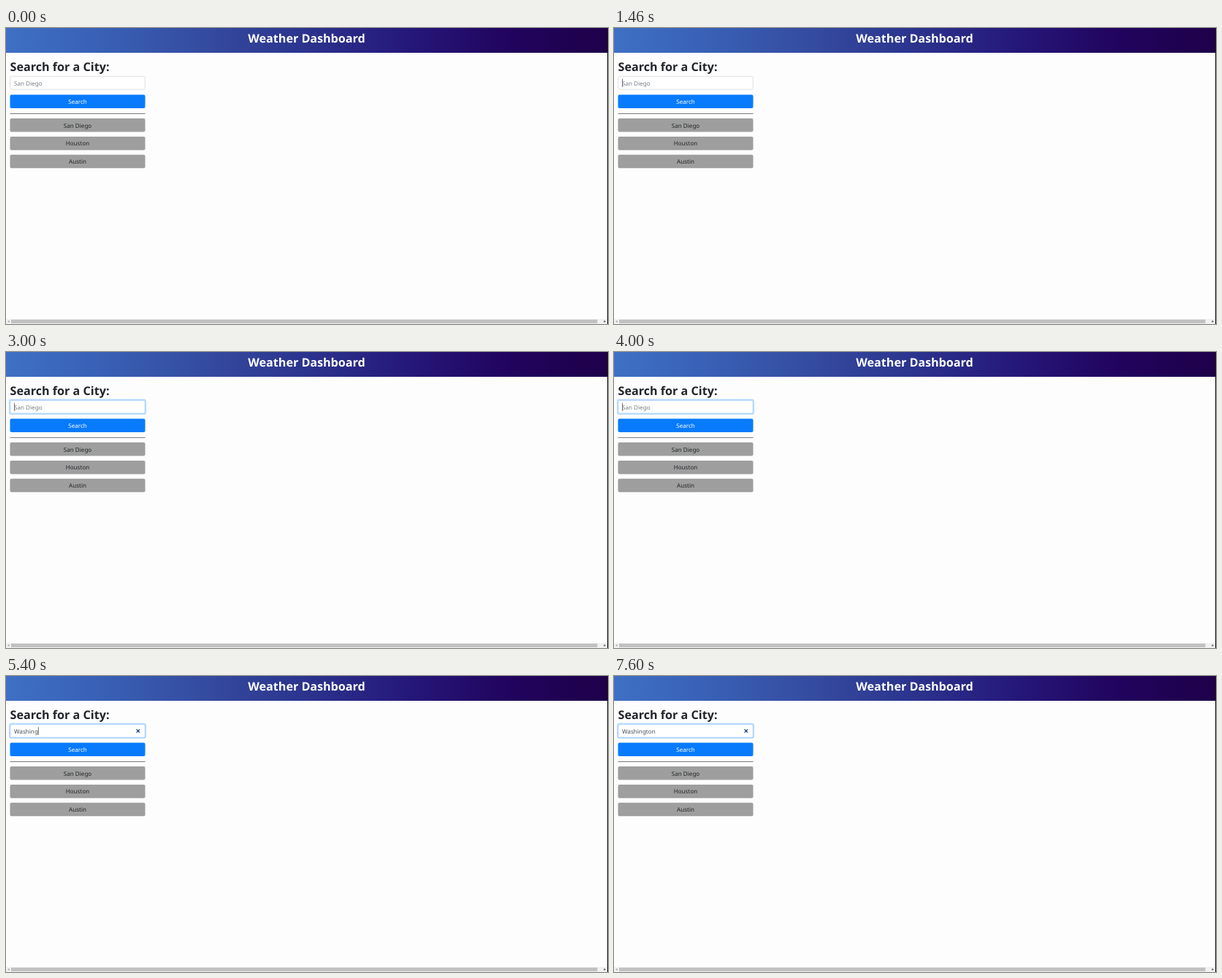
Write an HTML page with a canvas that moves like this. It is 824 px wide and 406 px high and loops after 8000 ms.

```html
<!DOCTYPE html>
<html lang="en">
<head>
<meta charset="utf-8">
<title>Weather Dashboard</title>
<style>
html, body { margin: 0; width: 100%; height: 100%; overflow: hidden; background: #fdfdfd; }
canvas { display: block; width: 824px; height: 406px; }
</style>
</head>
<body>
<canvas id="stage"></canvas>
<script>
const W = 824, H = 406, LOOP = 8000;
const canvas = document.getElementById('stage');
const ctx = canvas.getContext('2d');
const dpr = window.devicePixelRatio || 1;
canvas.width = W * dpr;
canvas.height = H * dpr;
ctx.scale(dpr, dpr);
ctx.textRendering = 'geometricPrecision';

const FONT = '"Noto Sans", "Open Sans", sans-serif';
const LEFT = 5.5, WIDTH = 185;

const WORD = 'Washington';
const KEYS = [4330, 4600, 4730, 5000, 5130, 5260, 5400, 5600, 5730, 6000];
// Times at which the caret turns on and off in turn
const CARET = [1460, 1960, 2460, 3060, 3560, 4030, 4330, 6600, 7060, 7600];
// Mouse path: time, x, y
const MOUSE = [[60, 812, 244], [300, 390, 214], [530, 127, 170], [800, 127, 170], [1100, 116, 122], [1300, 104, 85]];

const clamp = v => Math.max(0, Math.min(1, v));
const ease = v => v * v * (3 - 2 * v);

function rect(x, y, w, h, color) {
  ctx.fillStyle = color;
  ctx.fillRect(x, y, w, h);
}

function rounded(x, y, w, h, r, color) {
  ctx.beginPath();
  ctx.roundRect(x, y, w, h, r);
  ctx.fillStyle = color;
  ctx.fill();
}

function text(str, x, y, size, color, align = 'left', weight = 400) {
  ctx.font = `${weight} ${size}px ${FONT}`;
  ctx.textAlign = align;
  ctx.fillStyle = color;
  ctx.fillText(str, x, y);
}

function button(label, y, fill, color) {
  rounded(LEFT, y, WIDTH, 18.5, 2, fill);
  text(label, LEFT + WIDTH / 2, y + 12.5, 8.1, color, 'center');
}

function header() {
  const g = ctx.createLinearGradient(0, 0, W, 0);
  const colors = ['#3e70c4', '#385fb4', '#344b9f', '#2b338d', '#25187a', '#21045e', '#1f0049'];
  colors.forEach((c, i) => g.addColorStop(i / (colors.length - 1), c));
  rect(0, 0, W, 34, g);
  text('Weather Dashboard', 411.5, 20.2, 16.1, '#fff', 'center', 700);
}

function arrow(x, dir, color) {
  ctx.beginPath();
  ctx.moveTo(x + dir * 1.3, 402.5);
  ctx.lineTo(x - dir, 400.8);
  ctx.lineTo(x - dir, 404.2);
  ctx.fillStyle = color;
  ctx.fill();
}

function scrollbar() {
  rect(0, 399, W, 7, '#f1f1f1');
  rect(7, 400, 802.5, 5, '#c1c1c1');
  arrow(3.5, -1, '#a3a3a3');
  arrow(819.5, 1, '#505050');
}

function field(t) {
  const focus = ease(clamp((t - 1480) / 200));
  const typed = WORD.slice(0, KEYS.filter(k => t >= k).length);
  if (focus > 0) rounded(LEFT - 1.6, 64.4, WIDTH + 3.2, 21.7, 3, `rgba(0,123,255,${0.25 * focus})`);
  rounded(LEFT, 66, WIDTH, 18.5, 2, '#fff');
  const mix = (a, b) => Math.round(a + (b - a) * focus);
  ctx.beginPath();
  ctx.roundRect(LEFT + 0.3, 66.3, WIDTH - 0.6, 17.9, 2);
  ctx.lineWidth = 0.7;
  ctx.strokeStyle = `rgb(${mix(206, 128)},${mix(212, 189)},${mix(218, 255)})`;
  ctx.stroke();

  text(typed || 'San Diego', 11, 78.9, 8.1, typed ? '#495057' : '#777e85');
  if (CARET.filter(c => t >= c).length % 2) {
    const x = 11 + (typed ? ctx.measureText(typed).width : 0);
    rect(x, 70, 0.8, 11, '#495057');
  }
  if (typed) {
    ctx.beginPath();
    ctx.moveTo(178.6, 73.2);
    ctx.lineTo(183, 77.6);
    ctx.moveTo(183, 73.2);
    ctx.lineTo(178.6, 77.6);
    ctx.lineWidth = 1.3;
    ctx.strokeStyle = '#1c3f7c';
    ctx.stroke();
  }
}

function mouse(t) {
  const i = MOUSE.findIndex(p => p[0] > t);
  if (i < 1) return;
  const [a, b] = [MOUSE[i - 1], MOUSE[i]];
  const k = (t - a[0]) / (b[0] - a[0]);
  ctx.save();
  ctx.translate(a[1] + (b[1] - a[1]) * k, a[2] + (b[2] - a[2]) * k);
  ctx.beginPath();
  [[0, 0], [0, 7], [1.6, 5.6], [2.7, 8], [3.8, 7.5], [2.8, 5.1], [4.9, 5]].forEach(p => ctx.lineTo(...p));
  ctx.closePath();
  ctx.fillStyle = '#fff';
  ctx.fill();
  ctx.lineWidth = 0.6;
  ctx.strokeStyle = '#333';
  ctx.stroke();
  ctx.restore();
}

function draw(t) {
  rect(0, 0, W, H, '#fdfdfd');
  header();
  text('Search for a City:', 5.5, 58.6, 16.15, '#212529', 'left', 700);
  field(t);
  button('Search', 91.5, '#087bfd', '#fff');
  rect(LEFT, 117, WIDTH, 0.8, '#5c5c5c');
  ['San Diego', 'Houston', 'Austin'].forEach((city, i) => button(city, 124 + i * 24.9, '#9e9e9e', '#212529'));
  scrollbar();
  rect(823, 0, 1, H, '#111');
  mouse(t);
}

let start;
function tick(now) {
  start ??= now;
  draw((now - start) % LOOP);
  requestAnimationFrame(tick);
}
draw(0);
requestAnimationFrame(tick);
</script>
</body>
</html>
```
